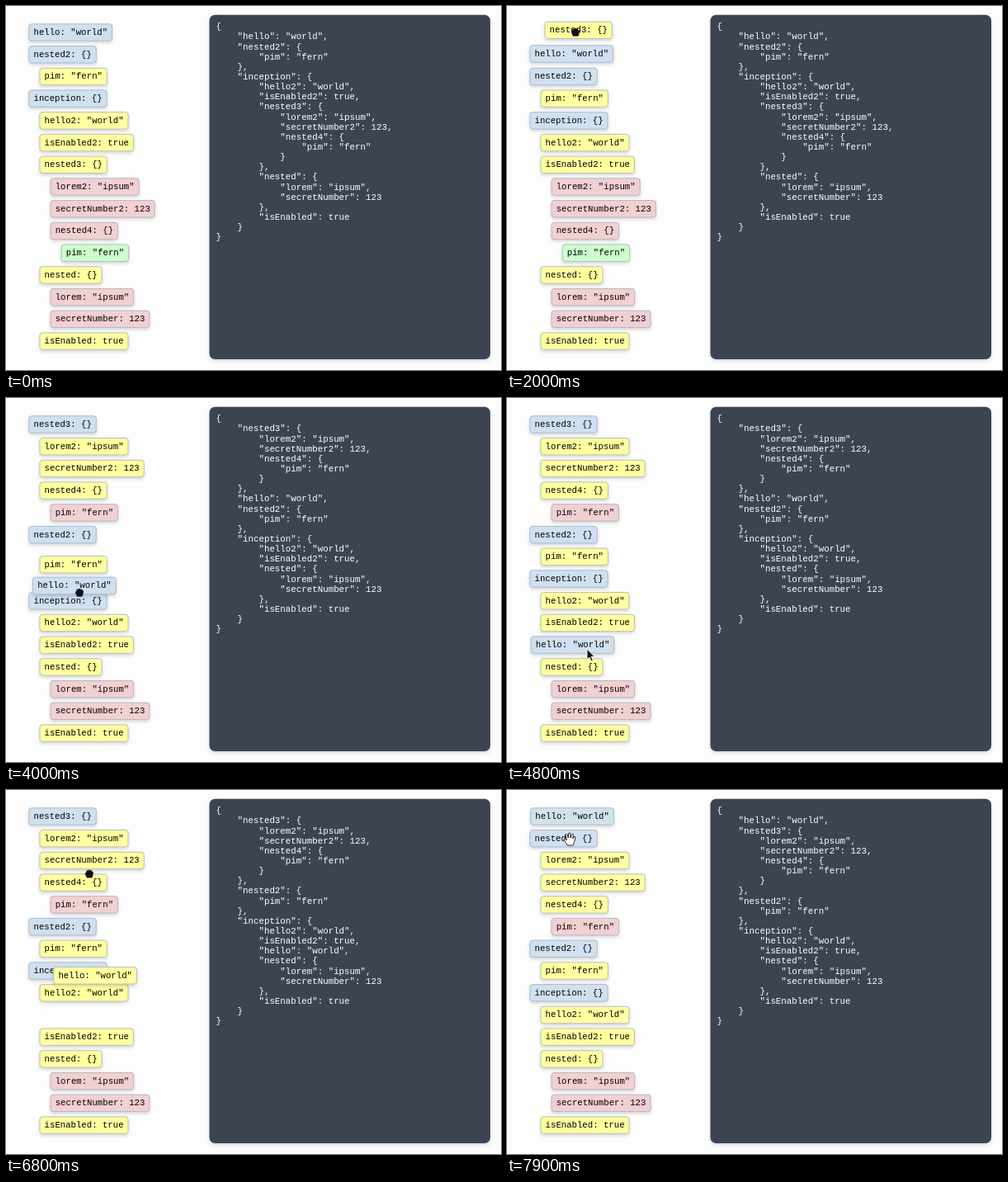
Animation of 600x441 px, one loop 8 s. Source, as an HTML page with a canvas:

```html
<!DOCTYPE html>
<html lang="en">
<head>
<meta charset="utf-8">
<title>Sortable tree</title>
<style>
html, body { margin: 0; width: 100%; height: 100%; overflow: hidden; background: #fdfdfe; }
canvas { display: block; }
</style>
</head>
<body>
<canvas id="stage" width="600" height="441"></canvas>
<script>
const ctx = document.getElementById('stage').getContext('2d');
const LOOP = 8000, STEP = 100, LAG = 100, SETTLE = 65;
const ROW = 26.72, TOP = 32, LEFT = 27.5, INDENT = 13.1, CHAR = 6.4;
const TAG_FONT = '10.67px "Liberation Mono", monospace';
const CODE_FONT = '10.8px "Liberation Mono", monospace';
const COLORS = [[207, 224, 240], [255, 255, 160], [242, 208, 210], [204, 255, 204]];

const tree = `hello: "world"
nested2: {}
 pim: "fern"
inception: {}
 hello2: "world"
 isEnabled2: true
 nested3: {}
  lorem2: "ipsum"
  secretNumber2: 123
  nested4: {}
   pim: "fern"
 nested: {}
  lorem: "ipsum"
  secretNumber: 123
 isEnabled: true`.split('\n').map((line, id) => {
  const label = line.trim();
  return { id, label, depth: line.length - label.length };
});

// A row is dragged from grab to drop; the tree and its listing follow at update.
const moves = [
  { from: 6, to: 0, count: 5, delta: -1, grab: 1080, drop: 2250, update: 2550 },
  { from: 5, to: 10, count: 1, delta: 1, grab: 3350, drop: 4650, update: 5000 },
  { from: 10, to: 0, count: 1, delta: -1, grab: 6250, drop: 7400, update: 7720 }
];

// Stops of the pointer as [time, x, y], with an eased glide between them.
const stops = [
  [900, 578, 330], [1080, 78, 195], [1810, 83, 32], [2750, 83, 32],
  [3350, 84, 170], [4000, 89, 236], [4600, 97, 304], [6000, 97, 304],
  [6250, 82, 304], [6620, 98, 280], [6895, 102, 34], [7400, 76, 34], [7800, 76, 60]
];

const cursors = {
  arrow: ['#111', '#fff', 'M0 0V13L3 10.2L5.2 15L7.3 14L5.1 9.4H9Z'],
  open: ['#fff', '#111', 'M-3 7C-4 4-7 1-7 0C-7-2-5-1-3.5 1L-5-5C-5-7-3-7-2.6-5L-1.8-2L-1.5-7C-1.3-8.5.6-8.5.7-7' +
    'L1-2L2.3-6C3-7.5 4.6-7 4.3-5.5L3.6-1L5-3C6-4.3 7.4-3.5 6.8-2C6 1 5.5 4 4 7Z'],
  fist: ['#111', '#1114', 'M-3 4.5L-4.5 1C-5.5-1-4-2.5-3.5-2C-3.5-5-1.8-5-1.4-3.7C-.9-5.5.9-5.5 1.2-3.7C1.8-5 3.5-4.6 3.5-2.7C5-3 5-1.8 4.5 1L3.4 4.5Z']
};

const mix = (a, b, k) => a + (b - a) * k;
const smooth = k => k * k * (3 - 2 * k);
const decay = elapsed => Math.exp(-elapsed / SETTLE);
const slot = (row, depth) => [LEFT + depth * INDENT, TOP + row * ROW];

function pointer(t) {
  const next = stops.findIndex(stop => stop[0] > t);
  if (next < 1) return stops.at(next).slice(1);
  const [from, to] = [stops[next - 1], stops[next]];
  const k = smooth((t - from[0]) / (to[0] - from[0]));
  return [mix(from[1], to[1], k), mix(from[2], to[2], k)];
}

const states = [tree];
for (const { from, to, count, delta } of moves) {
  const next = [...states.at(-1)];
  const block = next.splice(from, count).map(item => ({ ...item, depth: item.depth + delta }));
  next.splice(to, 0, ...block);
  states.push(next);
}

function toJson(items) {
  const parents = [{}];
  for (const { label, depth } of items) {
    const [key, text] = label.split(': ');
    const value = JSON.parse(text);
    parents[depth][key] = value;
    if (text === '{}') parents[depth + 1] = value;
  }
  return JSON.stringify(parents[0], null, 4).split('\n');
}
const listings = states.map(toJson);

// The dragged row trails the pointer, then settles into its new slot.
function dragged(move, depth, t) {
  const home = slot(move.from, depth), goal = slot(move.to, depth);
  const grip = pointer(move.grab);
  const held = pointer(Math.max(move.grab, Math.min(t, move.drop) - LAG));
  const pull = t > move.drop ? decay(t - move.drop) : 1;
  return home.map((p, i) => mix(goal[i], p + held[i] - grip[i], pull));
}

// Rows make room a little after the dragged row has passed them.
function rowShift(move, row, t) {
  const up = move.to < move.from, samples = 20;
  if (up ? row < move.to || row >= move.from : row <= move.from || row > move.to) return 0;
  let passed = 0;
  for (let i = 0; i < samples; i++) {
    const at = (dragged(move, 0, t - 70 - i * 9.5)[1] - TOP) / ROW;
    if (up ? at <= row + .5 : at >= row - .5) passed++;
  }
  return smooth(passed / samples) * (up ? 1 : -1);
}

function box(x, y, w, h, r, fill, shadow, blur) {
  ctx.save();
  ctx.shadowColor = shadow;
  ctx.shadowBlur = blur;
  ctx.shadowOffsetY = 2;
  ctx.fillStyle = fill;
  ctx.beginPath();
  ctx.roundRect(x, y, w, h, r);
  ctx.fill();
  ctx.restore();
}

function drawTag(label, depth, x, y) {
  const low = Math.floor(depth), high = Math.ceil(depth);
  const rgb = COLORS[low].map((c, i) => Math.round(mix(c, COLORS[high][i], depth - low)));
  const width = label.length * CHAR + 11.8;
  box(x, y - 10.6, width, 21.2, 3.5, `rgb(${rgb})`, 'rgba(0,0,0,.17)', 4);
  ctx.strokeStyle = '#adb8c3';
  ctx.lineWidth = .9;
  ctx.beginPath();
  ctx.roundRect(x + .4, y - 10.2, width - .8, 20.4, 3.2);
  ctx.stroke();
  ctx.fillStyle = '#000';
  ctx.fillText(label, x + 6, y + 3);
}

function drawTree(t) {
  const done = moves.filter(m => t >= m.update).length;
  const move = moves[done], last = moves[done - 1], items = states[done];
  const dragging = move && t >= move.grab;
  const rest = last ? decay(t - last.update) : 0;
  ctx.font = TAG_FONT;
  items.forEach((item, row) => {
    if (dragging && row === move.from) return;
    const before = last ? states[done - 1].find(o => o.id === item.id).depth : item.depth;
    const depth = mix(item.depth, before, rest);
    const shift = dragging ? rowShift(move, row, t) : 0;
    drawTag(item.label, depth, ...slot(row + shift, depth));
  });
  if (dragging) {
    const { label, depth } = items[move.from];
    drawTag(label, depth, ...dragged(move, depth, t));
  }
  ctx.font = CODE_FONT;
  ctx.fillStyle = '#fff';
  listings[done].forEach((line, i) => ctx.fillText(line, 254.6, 28.2 + i * 12.15));
}

function cursorKind(t) {
  if (t < moves[0].grab) return 'arrow';
  const move = moves.findLast(m => t >= m.grab);
  return t < move.drop ? 'fist' : t < move.update ? 'arrow' : 'open';
}

function drawCursor(t) {
  if (t < stops[0][0]) return;
  const [fill, stroke, shape] = cursors[cursorKind(t)], path = new Path2D(shape);
  ctx.save();
  ctx.translate(...pointer(t));
  ctx.fillStyle = fill;
  ctx.strokeStyle = stroke;
  ctx.lineJoin = 'round';
  ctx.fill(path);
  ctx.stroke(path);
  ctx.restore();
}

function draw(now) {
  const t = Math.floor(now % LOOP / STEP) * STEP;
  ctx.fillStyle = '#fdfdfe';
  ctx.fillRect(0, 0, 600, 441);
  box(246.5, 10.7, 340.5, 417.3, 7, '#3d4451', 'rgba(0,0,0,.15)', 5);
  drawTree(t);
  drawCursor(t);
}

const start = performance.now();
function tick() {
  draw(performance.now() - start);
  requestAnimationFrame(tick);
}
tick();
</script>
</body>
</html>
```
